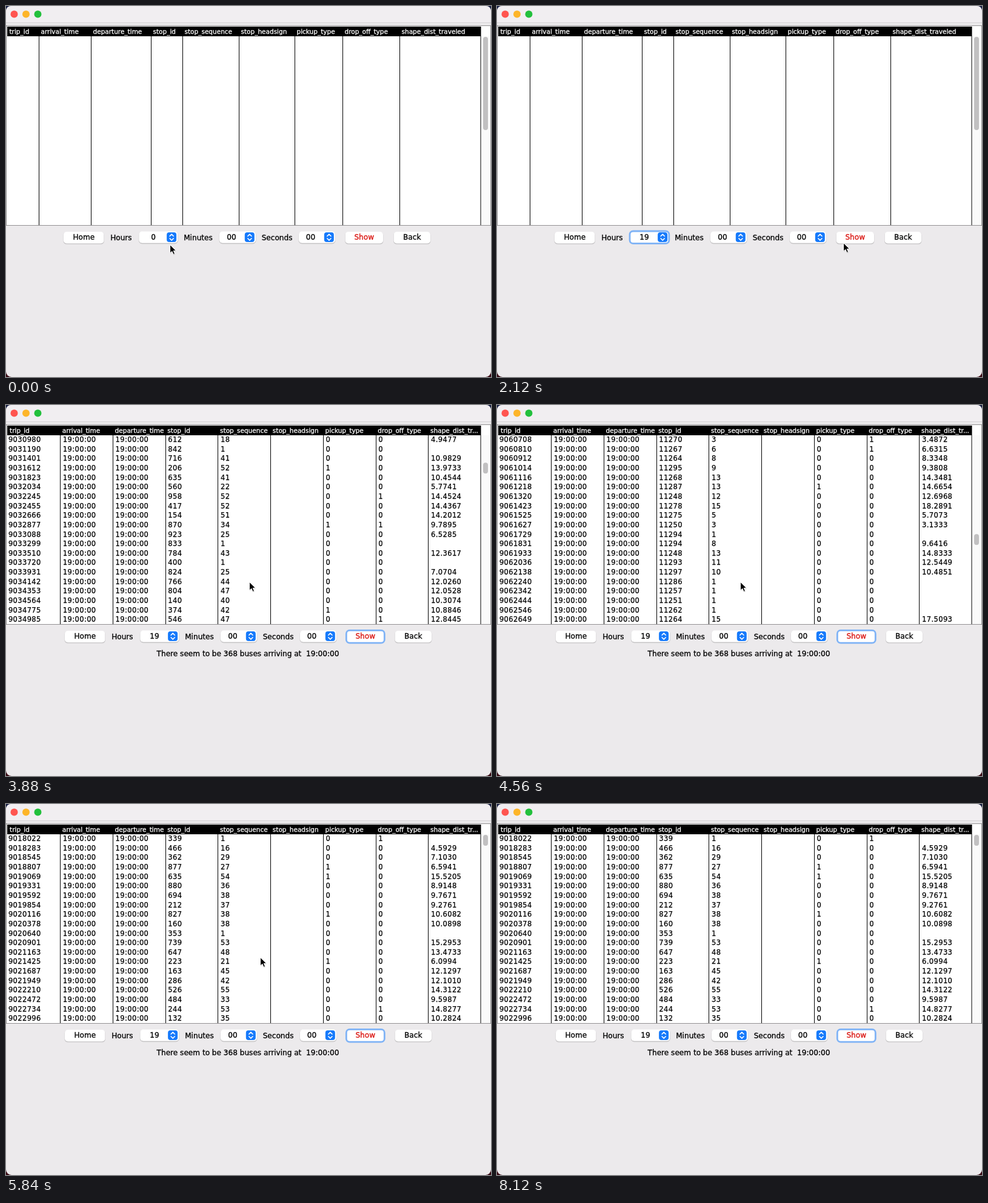
Write an HTML page that moves like this. It is 800 px wide and 613 px high and loops after 9 s.

```html
<!DOCTYPE html>
<html lang="en">
<head>
<meta charset="utf-8">
<title>Stop times</title>
<style>
  html, body { margin: 0; width: 100%; height: 100%; overflow: hidden; background: #1b2347; }
  svg { display: block; width: 800px; height: 613px; }
  text { font-family: "DejaVu Sans", sans-serif; font-size: 12.1px; fill: #000; white-space: pre; }
  .head { font-size: 10.5px; fill: #fff; stroke: #fff; stroke-width: .3; }
  .cell { font-size: 11.5px; letter-spacing: .38px; stroke: #000; stroke-width: .25; }
  .label { stroke: #000; stroke-width: .3; }
  .mid { text-anchor: middle; }
  .red { fill: #d9100c; stroke: #d9100c; }
</style>
</head>
<body>
<svg id="stage" viewBox="0 0 800 613" xmlns="http://www.w3.org/2000/svg"></svg>
<script>
const LOOP = 9000, STEP = 40, ROWS = 20, TOTAL = 368, ROW_H = 15.63;
const PICKED = 1520, CLICKED = 2760, LOADED = 2800;

const headers = ['trip_id', 'arrival_time', 'departure_time', 'stop_id', 'stop_sequence',
  'stop_headsign', 'pickup_type', 'drop_off_type', 'shape_dist_traveled'];
const emptyEdges = [2, 54, 140, 239, 291, 384, 476, 555, 649, 782.5];
const fullEdges = emptyEdges.map((_, i) => 2.6 + 86.75 * i);

// Keys: position, then values, joined by straight lines
function at(keys, t) {
  const i = keys.findIndex(k => k[0] > t);
  if (i < 0) return keys[keys.length - 1].slice(1);
  const a = keys[i - 1], b = keys[i], p = (t - a[0]) / (b[0] - a[0]);
  return a.slice(1).map((v, n) => v + (b[n + 1] - v) * p);
}

// Each zone of the list: range of stops, share of first stops, range of sequence, distance per stop
const zones = [
  { from: 0, stop: 110, stops: 850, starts: .15, seq: 13, seqs: 44, dist: .27 },
  { from: 100, stop: 11248, stops: 53, starts: .25, seq: 3, seqs: 13, dist: 1.15 },
  { from: 300, stop: 217, stops: 4540, starts: .55, seq: 30, seqs: 50, dist: .3 }
];
const trips = [[0, 9018022], [35, 9027185], [194, 9060708], [213, 9062649],
  [331, 9072029], [337, 9074021], [338, 9130913], [TOTAL, 9139400]];

function record(row) {
  const rnd = k => { const v = Math.sin(row * 12.9898 + k * 78.233) * 43758.5453; return v - Math.floor(v); };
  const z = zones.filter(zone => zone.from <= row).pop();
  const first = row === 0 || rnd(1) < z.starts;
  const seq = first ? 1 : z.seq + Math.floor(rnd(2) * z.seqs);
  return [
    Math.floor(at(trips, row)[0]), '19:00:00', '19:00:00',
    z.stop + Math.floor(rnd(3) * z.stops), seq, '',
    !first && rnd(4) < .18 ? 1 : 0,
    rnd(5) < .09 ? 1 : 0,
    first ? '' : (seq * z.dist * (.9 + .2 * rnd(6))).toFixed(4)
  ];
}
const table = Array.from({ length: TOTAL }, (_, row) => record(row));

const stage = document.getElementById('stage');
function add(tag, attrs, parent = stage, content) {
  const el = document.createElementNS('http://www.w3.org/2000/svg', tag);
  for (const k in attrs) el.setAttribute(k, attrs[k]);
  if (content !== undefined) el.textContent = content;
  parent.appendChild(el);
  return el;
}
const rect = (x, y, width, height, fill, more, parent) =>
  add('rect', { x, y, width, height, fill, ...more }, parent);
const label = (x, y, str, cls = 'label', parent) => add('text', { x, y, class: cls }, parent, str);
const show = (el, on) => el.setAttribute('visibility', on ? 'visible' : 'hidden');

// Window
rect(0, 0, 800, 306, '#1b2347');
rect(0, 306, 800, 307, '#3a0c16');
rect(0, 0, 800, 613, '#eceaec', { rx: 9 });
add('path', { d: 'M0 28V9Q0 0 9 0H791Q800 0 800 9V28Z', fill: '#f1eef1' });
rect(0, 27, 800, 1, '#d6d4d6');
['#ff5550', '#fdb52a', '#22c03c'].forEach((fill, i) =>
  add('circle', { cx: 13.5 + 19.5 * i, cy: 13.5, r: 6, fill }));

// Table
rect(.5, 32.5, 799, 330, '#fff', { stroke: '#929092' });
rect(784, 50, 15, 312, '#fafafa');
rect(2, 34, 781, 16, '#000');
const lines = emptyEdges.slice(1, -1).map(() => rect(0, 50, 1, 312, '#000'));
rect(782.5, 34, 1, 328, '#000');
const heads = headers.map(h => label(0, 46, h, 'head'));
const thumb = rect(787, 51, 8, 154, '#c1c0c1', { rx: 4 });
const body = add('g', {});
const cells = Array.from({ length: ROWS }, (_, r) => headers.map((_, c) =>
  label(c ? fullEdges[c] + 4.5 : 3.9, 61.2 + r * ROW_H, '', 'cell', body)));

// Controls
const controls = add('g', {});
function box(x, y, w, h) {
  rect(x - .5, y + .4, w + 1, h + 1, '#000', { rx: 5.5, opacity: .1 }, controls);
  rect(x, y + .6, w, h, '#000', { rx: 5, opacity: .16 }, controls);
  rect(x, y, w, h, '#fff', { rx: 5 }, controls);
}
function button(x, w, str, cls = '') {
  box(x, 373, w, 19.5);
  label(x + w / 2, 386.4, str, 'label mid ' + cls, controls);
}
function combo(x, w, value, mid) {
  box(x, 372.5, w, 19.3);
  const bx = x + w - 18.2;
  rect(bx, 374, 16, 16, '#167afb', { rx: 4 }, controls);
  add('path', {
    d: `M${bx + 5} 380.2l3.1-3.1 3.1 3.1M${bx + 5} 384l3.1 3.1 3.1-3.1`, fill: 'none',
    stroke: '#fff', 'stroke-width': 1.6, 'stroke-linecap': 'round', 'stroke-linejoin': 'round'
  }, controls);
  return label(mid, 386.4, value, 'label mid', controls);
}
const ring = (x, y, w, h) => rect(x, y, w, h, 'none',
  { rx: 5.5, stroke: '#7fb3f6', 'stroke-width': 2.8 }, controls);

button(95, 66.5, 'Home');
label(172.2, 387.2, 'Hours', 'label', controls);
const hours = combo(219.3, 64, '0', 243);
label(293.2, 387.2, 'Minutes', 'label', controls);
combo(352, 60, '00', 372);
label(421.7, 387.2, 'Seconds', 'label', controls);
combo(483, 60, '00', 502.5);
button(559.5, 62.5, 'Show', 'red');
button(639.5, 60.5, 'Back');
const hoursRing = ring(219, 372, 64.8, 20.4);
const showRing = ring(559.3, 372.4, 63, 20.8);
const message = label(248.6, 414.8, 'There seem to be 368 buses arriving at  19:00:00');

// Pointer
const pointer = add('g', {});
const arrow = 'M-.4 .5V14.2L2.8 11.3 5.1 16.4 7.5 15.4 5.3 10.4H9.6Z';
add('path', { d: arrow, fill: '#000', opacity: .18, transform: 'translate(.4 1)' }, pointer);
add('path', { d: arrow, fill: '#000', stroke: '#fff', 'stroke-width': 1, 'stroke-linejoin': 'round' }, pointer);

// Pointer path (time, x, y) and first visible row (time, row)
const moves = [[0, 271, 394], [400, 272, 378], [1760, 272, 378], [2120, 572, 391], [2280, 647, 388],
  [2480, 647, 388], [2600, 576, 381], [2800, 576, 381], [3160, 402, 292], [5680, 402, 292],
  [5840, 420, 253], [5880, 420, 253], [6280, 672, 39], [6440, 695, 34], [6640, 695, 34],
  [6720, 707, 42], [6880, 707, 42], [7120, 708, 63], [7680, 708, 63], [7760, 789, 73],
  [7880, 789, 73], [8120, 808, 76]];
const scrolls = [[0, 0], [3160, 0], [3440, 16], [3600, 22], [3720, 22], [4120, 100], [4280, 100],
  [4560, 194], [4640, 194], [4960, 331], [5200, 348], [5360, 348], [5760, 0]];

let lastTop = -1;
function draw(time) {
  const t = Math.floor((time % LOOP) / STEP) * STEP;
  const loaded = t >= LOADED;
  const edges = loaded ? fullEdges : emptyEdges;
  lines.forEach((l, i) => l.setAttribute('x', Math.round(edges[i + 1] - .3)));
  heads.forEach((h, i) => h.setAttribute('x', edges[i] + 3.5));
  heads[8].textContent = loaded ? 'shape_dist_tr...' : headers[8];

  const top = Math.round(at(scrolls, t)[0]);
  if (top !== lastTop) {
    cells.forEach((row, r) => row.forEach((cell, c) => { cell.textContent = table[top + r][c]; }));
    lastTop = top;
  }
  show(body, loaded);
  show(message, loaded);
  thumb.setAttribute('y', loaded ? 51 + 291 * top / (TOTAL - ROWS) : 51);
  thumb.setAttribute('height', loaded ? 18 : 154);

  controls.setAttribute('transform', `translate(${loaded ? 2 : 0} 0)`);
  hours.textContent = t < PICKED ? '0' : '19';
  show(hoursRing, t >= PICKED && t < CLICKED);
  show(showRing, t >= CLICKED);

  const [x, y] = at(moves, t);
  pointer.setAttribute('transform', `translate(${x} ${y})`);
}

const begin = performance.now();
function tick() {
  draw(performance.now() - begin);
  requestAnimationFrame(tick);
}
draw(0);
requestAnimationFrame(tick);
</script>
</body>
</html>
```
